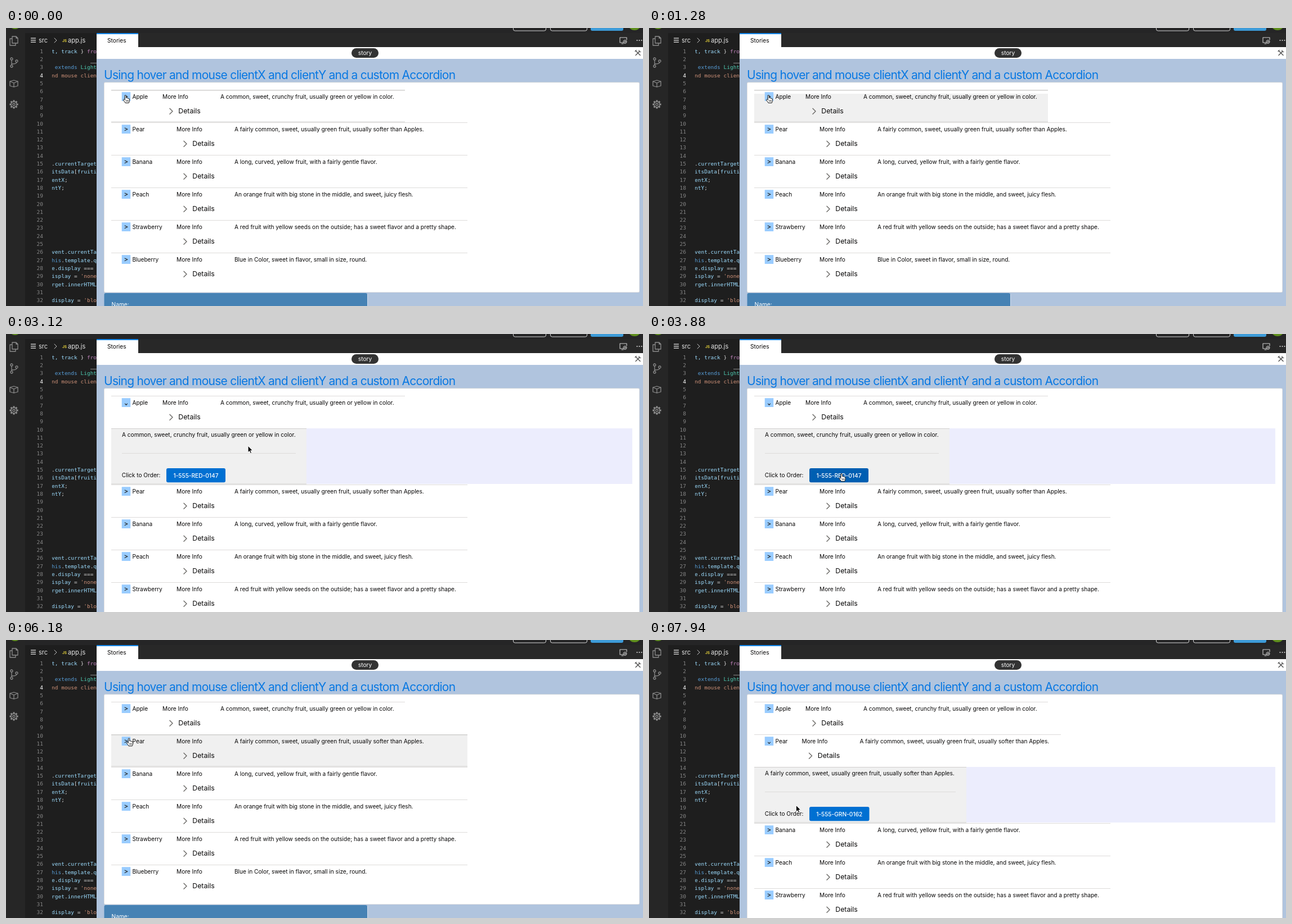
These frames come from a looping animation (1132x495 px, 7990 ms). An HTML page with a canvas:

```html
<!DOCTYPE html>
<html lang="en">
<head>
<meta charset="utf-8">
<title>Custom accordion</title>
<style>
html, body { margin: 0; width: 100%; height: 100%; overflow: hidden; background: #1e1e1e; }
canvas { display: block; }
</style>
</head>
<body>
<canvas id="stage" width="1132" height="495"></canvas>
<script>
const ctx = document.getElementById('stage').getContext('2d');
const LOOP = 7990;
const SANS = 'Inter, "Liberation Sans", sans-serif';
const MONO = '"DejaVu Sans Mono", monospace';
const INK = '#080707', LINE = '#dddbda', HOVER_LINE = '#d0cfce', GREY = '#f0f0f0';
const ROW = 58, PANEL = 100, TOP = 110, LEFT = 187;

const fruits = [
  { name: 'Apple', text: 'A common, sweet, crunchy fruit, usually green or yellow in color.', phone: '1-555-RED-0147', shift: 25, end: 709, wide: 709, panelEnd: 534, button: 105 },
  { name: 'Pear', text: 'A fairly common, sweet, usually green fruit, usually softer than Apples.', phone: '1-555-GRN-0162', shift: 31.5, end: 732, wide: 820, panelEnd: 564, button: 106.5 },
  { name: 'Banana', text: 'A long, curved, yellow fruit, with a fairly gentle flavor.' },
  { name: 'Peach', text: 'An orange fruit with big stone in the middle, and sweet, juicy flesh.' },
  { name: 'Strawberry', text: 'A red fruit with yellow seeds on the outside; has a sweet flavor and a pretty shape.' },
  { name: 'Blueberry', text: 'Blue in Color, sweet in flavor, small in size, round.' }
];

const C = { v: '#9cdcfe', w: '#d4d4d4', p: '#c586c0', b: '#569cd6', g: '#4ec9b0', s: '#ce9178' };
// line number: colour key and text, in turn
const code = {
  1: ['v', 't, track ', 'w', '} ', 'p', 'fro'],
  3: ['b', ' extends ', 'g', 'Light'],
  4: ['s', 'nd mouse clien'],
  15: ['w', '.', 'v', 'currentTarget'],
  16: ['v', 'itsData', 'w', '[', 'v', 'fruiti'],
  17: ['v', 'entX', 'w', ';'],
  18: ['v', 'ntY', 'w', ';'],
  26: ['v', 'vent', 'w', '.', 'v', 'currentTa'],
  27: ['b', 'his', 'w', '.', 'v', 'template', 'w', '.', 'v', 'q'],
  28: ['v', 'e', 'w', '.', 'v', 'display', 'w', ' ==='],
  29: ['v', 'isplay', 'w', ' = ', 's', "'none"],
  30: ['v', 'rget', 'w', '.', 'v', 'innerHTML'],
  32: ['v', 'display', 'w', ' = ', 's', "'blo"]
};

// pointer strokes: each is a list of [time, x, y]
const moves = [
  [[0, 212.5, 120]],
  [[1940, 215, 125], [2060, 235, 150], [2230, 272, 203], [2420, 292, 214], [2680, 300, 197]],
  [[2770, 312, 194], [3000, 400, 190], [3200, 451, 206], [3380, 420, 232], [3530, 372, 247]],
  [[3590, 364, 248], [3880, 342, 249], [4080, 310, 256], [4370, 250, 267]],
  [[4430, 249, 270], [4490, 247, 272], [4600, 236, 252], [4800, 214, 190], [4950, 203, 146], [5060, 200.5, 126]],
  [[5270, 204, 126], [5330, 208.5, 126]],
  [[5620, 208.5, 126], [5710, 211, 146], [5790, 216, 177], [5890, 219, 191]],
  [[6060, 219, 187], [6120, 218.5, 180], [6180, 218.5, 175]],
  [[6770, 223, 180], [7000, 272, 203], [7200, 370, 234], [7400, 482, 234], [7530, 526, 228]],
  [[7590, 512, 230], [7770, 380, 262], [7940, 260, 295]]
];

function rect(x, y, w, h, fill, r = 0) {
  ctx.fillStyle = fill;
  ctx.beginPath();
  ctx.roundRect(x, y, w, h, r);
  ctx.fill();
}

function text(str, x, y, size = 10.12, fill = INK, { family = SANS, weight = 400, align = 'left', gap = 0 } = {}) {
  ctx.font = `${weight} ${size}px ${family}`;
  ctx.letterSpacing = gap + 'px';
  ctx.textAlign = align;
  ctx.fillStyle = fill;
  ctx.fillText(str, x, y);
}

function stroke(d, color, width = 1, x = 0, y = 0, fill) {
  ctx.save();
  ctx.translate(x, y);
  const path = new Path2D(d);
  if (fill) { ctx.fillStyle = fill; ctx.fill(path); }
  ctx.strokeStyle = color;
  ctx.lineWidth = width;
  ctx.lineJoin = ctx.lineCap = 'round';
  ctx.stroke(path);
  ctx.restore();
}

const disc = (x, y, r, fill) => rect(x - r, y - r, 2 * r, 2 * r, fill, r);

function pointer(t) {
  const path = moves.filter(m => m[0][0] <= t).pop();
  const start = path[0][0];
  const now = start + Math.floor((t - start) / 58) * 58;
  const i = path.findIndex(k => k[0] > now);
  if (i < 0) return path[path.length - 1].slice(1);
  const [a, b] = [path[i - 1], path[i]];
  const p = (now - a[0]) / (b[0] - a[0]);
  return [a[1] + (b[1] - a[1]) * p, a[2] + (b[2] - a[2]) * p];
}

function openRow(t) {
  if (t >= 6540) return 1;
  return (t >= 300 && t < 1280) || (t >= 1730 && t < 5620) ? 0 : -1;
}

function drawEditor() {
  rect(0, 0, 1132, 495, '#1e1e1e');
  rect(0, 0, 1132, 9, '#252526');
  rect(161, 9, 971, 25, '#282828');
  rect(0, 0, 34, 495, '#262626');
  disc(16, -9, 11, '#5f8f1d');

  const grey = '#8c8c8c';
  stroke('M-3 -8H4L7 -5V4H-3ZM4 -8V-5H7M-3 -4H-7V8H3V4', grey, 1.3, 14, 23);
  stroke('M-2 -6A2 2 0 1 1 -6 -6A2 2 0 1 1 -2 -6M-2 7A2 2 0 1 1 -6 7A2 2 0 1 1 -2 7M7 -2A2 2 0 1 1 3 -2A2 2 0 1 1 7 -2M-4 -4V5M5 0Q5 3 -4 3', grey, 1.3, 14, 61);
  stroke('M0 -6L7 -4V4L0 6L-7 4V-4ZM-7 -4L0 -1L7 -4M0 -1V6', grey, 1.3, 14, 99);
  ctx.save();
  ctx.translate(14, 136);
  for (let i = 0; i < 8; i++, ctx.rotate(Math.PI / 4)) rect(-1.5, -7.6, 3, 3, grey);
  ctx.restore();
  stroke('M5 0A5 5 0 1 1 -5 0A5 5 0 1 1 5 0M2 0A2 2 0 1 1 -2 0A2 2 0 1 1 2 0', grey, 1.3, 14, 136);

  for (const y of [17.5, 21, 24.5]) rect(44, y, 9, 1.3, '#e4e4e4');
  text('src', 58, 26, 11, '#e4e4e4');
  stroke('M-2 -4L2 0L-2 4', '#c8c8c8', 1, 88, 22);
  text('JS', 100, 24.5, 6.5, '#e5d13a', { weight: 700 });
  text('app.js', 110, 26, 11, '#e4e4e4');

  for (let n = 1; n <= 32; n++) {
    text(n, 66, lineY(n), 9.5, n === 4 ? '#fff' : '#858585', { family: MONO, align: 'right' });
  }
  ctx.save();
  ctx.beginPath();
  ctx.rect(82, 34, 79, 461);
  ctx.clip();
  for (const [n, parts] of Object.entries(code)) {
    let x = 81;
    for (let i = 0; i < parts.length; i += 2) {
      text(parts[i + 1], x, lineY(n), 9.5, C[parts[i]], { family: MONO });
      x += ctx.measureText(parts[i + 1]).width;
    }
  }
  ctx.restore();
  rect(150, 62, 11, 1, '#8a8a8a');
}

const lineY = n => 44.8 + (n - 1) * 14.3;

function drawChrome() {
  for (const [x, w] of [[901, 59], [967, 66]]) {
    ctx.strokeStyle = '#d8d8d8';
    ctx.lineWidth = 1;
    ctx.beginPath();
    ctx.roundRect(x + .5, -15.5, w - 1, 20.5, 3);
    ctx.stroke();
  }
  rect(1039, -15, 58, 20, '#3d9bd8', 3);
  disc(1117, -8, 12, '#5f8f1d');
  rect(161, 9, 74, 26, '#fff');
  rect(161, 9, 74, 2, '#1589ee');
  text('Stories', 180, 25.5, 10.2);
  stroke('M1 4H-6V-5H6V-1M-3 6H0', '#d0d0d0', 1.1, 1097, 22);
  stroke('M3 0A3 3 0 1 1 -3 0A3 3 0 1 1 3 0M1 0A1 1 0 1 1 -1 0A1 1 0 1 1 1 0', '#d0d0d0', 1, 1100, 24.5);
  for (let i = 0; i < 3; i++) disc(1121.5 + i * 4, 22, 1, '#e0e0e0');

  rect(161, 34, 971, 21, '#fff');
  rect(614, 36, 48, 17, '#333', 8.5);
  text('story', 638, 48, 10.2, '#fff', { align: 'center' });
  stroke('M-4 4L3 -3M-4 -4L4 4', '#555', 1.5, 1123, 44.5);
  stroke('M2 -5L2 -2L5 -2M-5 -3L-3 -5', '#555', 1.2, 1123, 44.5);

  rect(161, 55, 971, 440, '#b0c4de');
  text('Using hover and mouse clientX and clientY and a custom Accordion', 174, 90.7, 21, '#0878e2', { gap: -.75 });
}

function drawRow(f, i, y, isOpen, hovered, t) {
  const narrow = i === 0 || isOpen;
  const end = narrow ? f.end : 820;
  const dx = narrow ? -f.shift : 0;
  if (hovered) {
    const cut = i === 0 && t < 1940 ? 7 : 0;
    if (t >= 300) rect(LEFT, y + cut, end - LEFT, 57 - cut, GREY);
  }
  rect(LEFT, y, end - LEFT, 1, LINE);
  if (hovered) {
    rect(LEFT, y, end - LEFT, 1.5, HOVER_LINE);
    rect(LEFT, y + 56.5, end - LEFT, 1, HOVER_LINE);
  }
  rect(205.7, y + 4.2, 15.5, 15.8, '#99ccff');
  stroke(isOpen ? 'M-2 1.8L0 4L2 1.8' : 'M-2.4 -2.3L2.4 0L-2.4 2.3', '#222', 1.1, 213.5, y + 12.3);
  text(f.name, 224.5, y + 15.6);
  text('More Info', 303 + dx, y + 15.6);
  text(f.text, 406 + dx, y + 15.6);
  stroke('M-2.5 -5L2.5 0L-2.5 5', '#706e6b', 1.5, 318.5 + dx, y + 38.3);
  text('Details', 331.3 + dx, y + 41.5, 12.3);
}

function drawPanel(f, y, hovered, pressed) {
  rect(LEFT, y, 926, 99, '#ecedfd');
  const w = f.panelEnd - LEFT;
  if (hovered) {
    rect(LEFT, y, w, 99, GREY);
    rect(LEFT, y, w, 1, HOVER_LINE);
    rect(LEFT, y + 98.5, w, 1, HOVER_LINE);
  } else {
    rect(LEFT, y, w, 1, LINE);
  }
  text(f.text, 206, y + 14.8);
  rect(206, y + 44, f.panelEnd - 225, 1, LINE);
  text('Click to Order:', 205.8, y + 86.8);
  rect(285, y + 71, f.button, 25.3, pressed ? '#005fb2' : '#0070d2', 3);
  text(f.phone, 285 + f.button / 2, y + 87.8, 10.2, '#fff', { align: 'center', weight: 500 });
}

function drawPointer(x, y, hand) {
  if (hand) {
    stroke('M-1.2 7V1Q-1.2 -.3 0 -.3Q1.2 -.3 1.2 1V4.4Q2.6 3.7 3.3 5Q4.7 4.4 5.2 5.7Q7 5.4 7 7.2V9.5Q6.8 11.5 5.7 13.4H-.5Q-1.6 11 -3.7 9Q-4.6 7.3 -3 6.9Q-2 7 -1.2 8Z', '#111', 1, x, y, '#fff');
    stroke('M1.2 8.5V11M3 8.5V11M4.8 8.5V11', '#111', .7, x, y);
  } else {
    stroke('M0 0V11.4L2.6 9L4.3 13L6.3 12.1L4.6 8.2H8Z', '#fff', .9, x, y, '#000');
  }
}

function draw(t) {
  const [px, py] = pointer(t);
  const open = openRow(t);
  let hand = false;

  drawEditor();
  drawChrome();
  const cardHeight = open < 0 ? 374.5 : 420;
  rect(174, 96.5, 952, cardHeight, LINE, 2);
  rect(174.8, 97.3, 950.4, cardHeight - 1.6, '#fff', 2);
  if (open < 0) {
    rect(174.5, 472, 467.5, 40, '#4682b4', 3);
    rect(642, 474, 1, 21, '#d3deeb');
    text('Name:', 187.5, 495.8, 10.2, '#fff');
  }

  let y = TOP;
  fruits.forEach((f, i) => {
    const isOpen = i === open;
    const end = isOpen ? f.end : f.wide || 820;
    const inRow = px >= LEFT && px < end && py >= y && py < y + ROW;
    hand = hand || (px >= 206 && px <= 221 && py >= y + 4 && py <= y + 20);
    drawRow(f, i, y, isOpen, inRow, t);
    y += ROW;
    if (!isOpen) return;
    const inPanel = px < f.panelEnd && py >= y && py < y + PANEL;
    const onButton = px >= 285 && px <= 285 + f.button && py >= y + 71 && py <= y + 96;
    hand = hand || onButton;
    drawPanel(f, y, inPanel, onButton);
    y += PANEL;
  });
  drawPointer(px, py, hand);
}

const began = performance.now();
function tick() {
  draw((performance.now() - began) % LOOP);
  requestAnimationFrame(tick);
}
tick();
</script>
</body>
</html>
```
